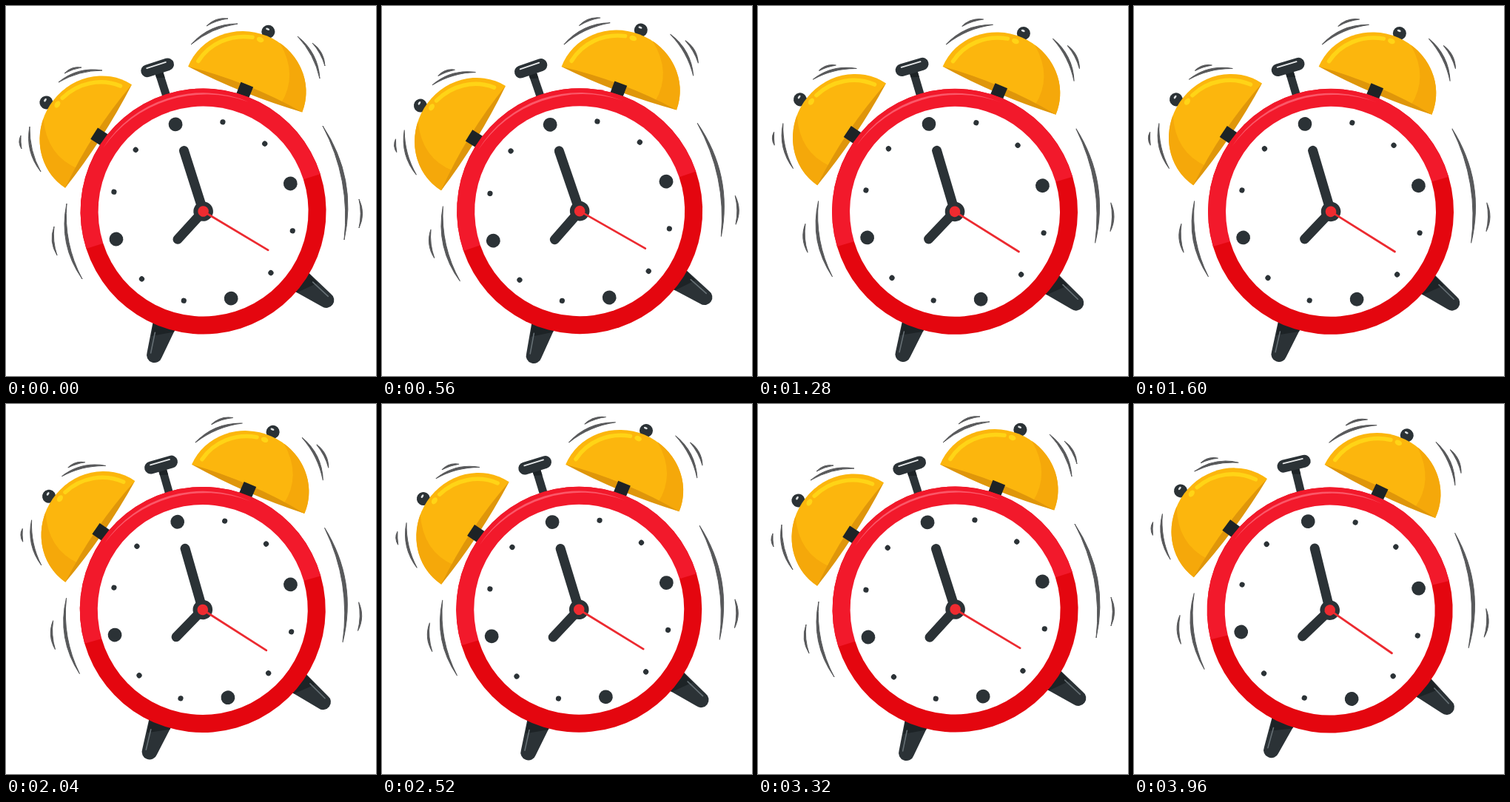
Recreate the animation shown at these times as an HTML page. Size 500 by 500 pixels, loop 4 s.

```html
<!DOCTYPE html>
<html lang="en">
<head>
<meta charset="utf-8">
<title>Ringing alarm clock</title>
<style>
  html, body { margin: 0; width: 100%; height: 100%; overflow: hidden; background: #fff; }
  svg { display: block; width: 100vw; height: 100vh; }
  .dark { fill: #2b3236; }
  .shadow { fill: #1d2326; }
  .hand { stroke: #2b3236; stroke-width: 13; stroke-linecap: round; }
  .shine { fill: none; stroke-linecap: round; }
</style>
</head>
<body>
<svg viewBox="0 0 500 500">
  <defs>
    <g id="bell">
      <rect class="dark" x="-6" y="-84" width="12" height="12"/>
      <circle class="dark" cy="-84" r="9"/>
      <ellipse cx="-2" cy="-87" rx="2.6" ry="1.4" fill="#dfe2e3"/>
      <path d="M-83 0A83 78 0 0 1 83 0Z" fill="#fcb60d"/>
      <path d="M20 -75.7A83 78 0 0 1 83 0H52Q60 -45 20 -75.7Z" fill="#f5a80a"/>
      <path d="M-83 0Q0 -11 83 0Q0 8 -83 0Z" fill="#df960a"/>
      <path class="shine" d="M-73 -12A75 71 0 0 1 -17 -69" stroke="#ffd416" stroke-width="5.5"/>
      <ellipse cx="-6" cy="-70" rx="5" ry="3.5" fill="#ffd416"/>
      <rect class="shadow" x="-9" y="-7" width="18" height="17"/>
    </g>
    <g id="foot">
      <path class="dark" d="M-17 150L-10.5 205A10.5 10.5 0 0 0 10.5 205L18 150Z"/>
      <path class="shadow" d="M-17 150L-15 167L12 182L18 150Z"/>
      <path class="shine" d="M9 176L5.5 204" stroke="#667075" stroke-width="1.6"/>
    </g>
    <g id="side">
      <use href="#foot" transform="rotate(-36.5)"/>
      <use href="#bell" transform="translate(104 -139.8) rotate(39.5)"/>
    </g>
  </defs>
  <g id="scene">
    <g id="marks" fill="#58595b" stroke="#58595b"></g>
    <g transform="translate(266.6 277.5) rotate(-17.7)">
      <use href="#side"/>
      <use href="#side" transform="scale(-1 1)"/>
      <path class="dark" d="M-5.5 -200H5.5V-160H-5.5Z"/>
      <path class="shadow" d="M-5.5 -198H5.5V-188L-5.5 -191Z"/>
      <rect class="dark" x="-23" y="-212.3" width="46" height="17" rx="8.5"/>
      <path class="shine" d="M-14 -207.5H13" stroke="#e8eaeb" stroke-width="1.8"/>
      <circle r="166" fill="#e4060f"/>
      <path d="M-166 0A166 166 0 0 1 166 0Z" fill="#f2192b"/>
      <path d="M-103 -122.6A160 160 0 0 1 103 -122.6A170 170 0 0 0 -103 -122.6Z" fill="#fb5869"/>
      <circle r="142" fill="#fff"/>
      <g id="dots" class="dark"></g>
      <path class="hand" d="M0 0V-86"/>
      <path class="hand" d="M0 0L-44.5 25.5"/>
      <circle class="dark" r="13.3"/>
      <path d="M0 0L67.5 76.5" stroke="#ec2a30" stroke-width="2.8" stroke-linecap="round"/>
      <circle r="7.3" fill="#ef2b30"/>
    </g>
  </g>
</svg>
<script>
const LOOP = 4000, STEP = 40, REST = -17.7;
const byId = id => document.getElementById(id);

// Hour dots, larger at the quarters.
byId('dots').innerHTML = Array.from({ length: 12 }, (_, hour) =>
  `<circle cy="-123.5" r="${hour % 3 ? 3.6 : 9.4}" transform="rotate(${hour * 30})"/>`).join('');

// Tapered crescent bulging outward; ends run clockwise around the clock.
function mark([x1, y1, x2, y2]) {
  const dx = x2 - x1, dy = y2 - y1, length = Math.hypot(dx, dy);
  const curve = bulge => {
    const k = 2 * bulge / length;
    return `Q${(x1 + x2) / 2 + dy * k} ${(y1 + y2) / 2 - dx * k}`;
  };
  const outer = 0.8 + length * 0.1, inner = outer - 1.8 - length * 0.017;
  return `<path d="M${x1} ${y1}${curve(outer)} ${x2} ${y2}${curve(inner)} ${x1} ${y1}Z"/>`;
}
byId('marks').innerHTML = [
  [428, 162, 457, 316], [477, 261, 477, 300],
  [103, 369, 82, 267], [69, 337, 65, 298],
  [47, 224, 32, 163], [21, 193, 20, 175],
  [71, 103, 130, 87], [79, 91, 102, 83],
  [250, 52, 313, 24], [271, 27, 300, 17],
  [394, 41, 424, 98], [414, 50, 431, 81]
].map(mark).join('');

// The tilt drifts between a few poses, with a quick swing that fades to nothing at each.
const poses = [[0, -17.7], [14, -18.9], [24, -16.5], [40, -16.5], [63, -17], [83, -17.7], [99, -13.8]];
const SWING = 1.8, SWING_STEPS = 8;
function tiltAt(step) {
  const next = Math.max(1, poses.findIndex(pose => pose[0] >= step));
  const [from, a] = poses[next - 1], [to, b] = poses[next];
  const u = (step - from) / (to - from);
  const swings = Math.round((to - from) / SWING_STEPS);
  return a + (b - a) * u + SWING * Math.sin(2 * Math.PI * swings * u);
}

function draw(time) {
  const step = Math.floor((time % LOOP) / STEP);
  byId('scene').setAttribute('transform', `rotate(${tiltAt(step) - REST} 250 250)`);
}
const start = performance.now();
function tick() {
  draw(performance.now() - start);
  requestAnimationFrame(tick);
}
tick();
</script>
</body>
</html>
```
